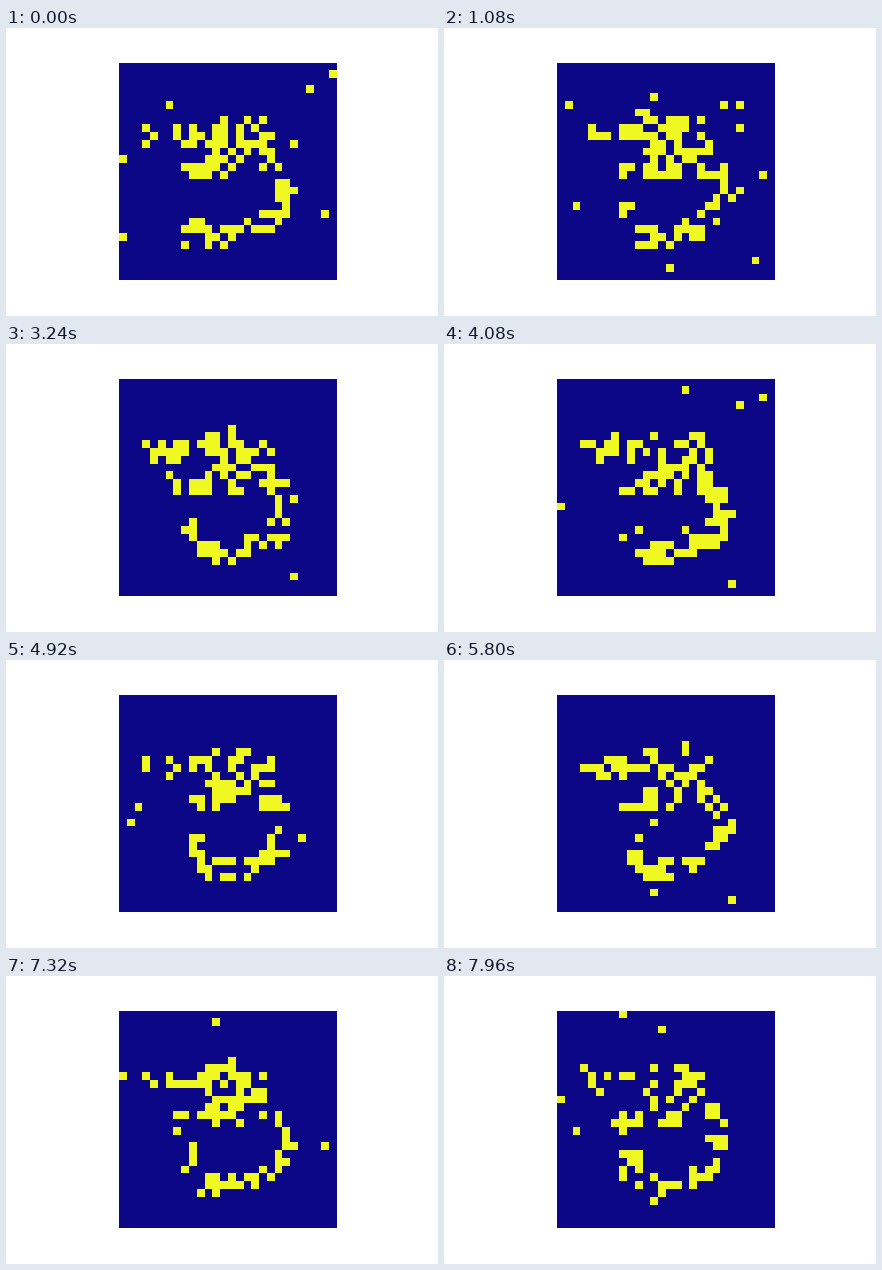
Animation of 432 by 288 pixels, one loop 8 s. Source, as a matplotlib script:

```python
import numpy as np
import matplotlib.pyplot as plt
from matplotlib.animation import FuncAnimation

np.random.seed(7)

SIZE = 28
FRAMES = 200
PEAK = 0.57     # firing chance inside a stroke
NOISE = 0.009   # firing chance of the background

# (half width, points as column, row)
STROKES = [
    (1.1, [(3.6, 8.6), (6, 9), (9.5, 8.6)]),
    (1.9, [(11.5, 8.3), (14, 8.2), (17, 8.2)]),
    (1.0, [(17.8, 7.6), (18.4, 10), (18.8, 12.5)]),
    (1.8, [(16, 9.8), (14.5, 11.5), (12, 12.2)]),
    (1.0, [(14.5, 13.5), (11, 13.3), (7.6, 13.8)]),
    (1.3, [(18.6, 12.8), (20.4, 14.5), (20.8, 17), (19.8, 19.6),
           (17, 21.2), (13.5, 22), (11, 22)]),
    (1.1, [(11, 22), (9.2, 20.6), (9.2, 18.4)]),
]

rows, cols = np.mgrid[:SIZE, :SIZE]


def segment_distance(a, b):
    (ax, ay), (bx, by) = a, b
    dx, dy = bx - ax, by - ay
    t = ((cols - ax) * dx + (rows - ay) * dy) / (dx * dx + dy * dy)
    t = np.clip(t, 0, 1)
    return np.hypot(cols - ax - t * dx, rows - ay - t * dy)


def firing_chance():
    ink = np.zeros((SIZE, SIZE))
    for width, points in STROKES:
        for a, b in zip(points, points[1:]):
            soft = np.clip(width + 0.5 - segment_distance(a, b), 0, 1)
            ink = np.maximum(ink, soft)
    return np.maximum(PEAK * ink, NOISE)


# every frame is an independent draw, fixed once so each loop is the same
spikes = (np.random.rand(FRAMES, SIZE, SIZE) < firing_chance()).astype(float)

fig, ax = plt.subplots(figsize=(6, 4), dpi=72, facecolor="white")
fig.subplots_adjust(left=0.125, right=0.9, bottom=0.125, top=0.88)
ax.axis("off")
image = ax.imshow(spikes[0], cmap="plasma", vmin=0, vmax=1,
                  interpolation="nearest")


def update(i):
    image.set_data(spikes[i])
    return [image]


anim = FuncAnimation(fig, update, frames=FRAMES, interval=40,
                     repeat=True, repeat_delay=0)
plt.show()
```
